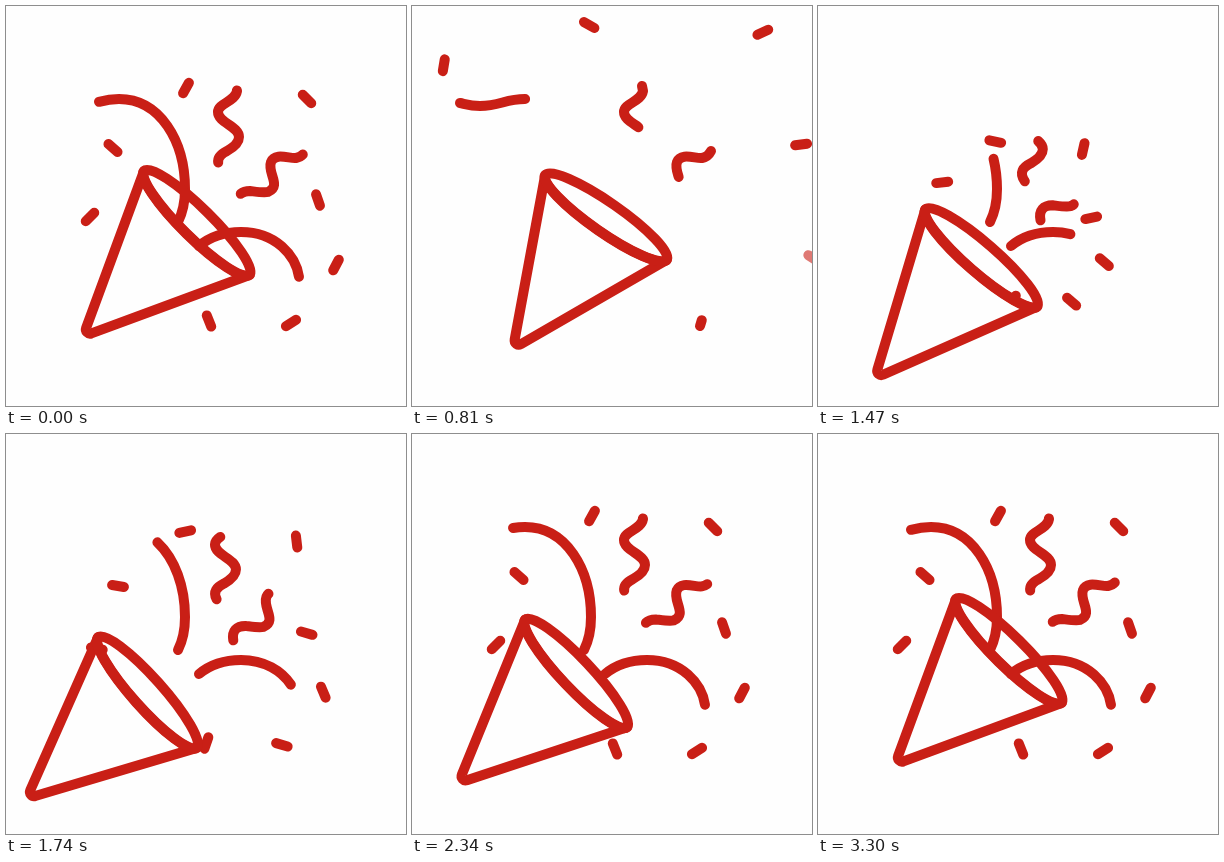
Write an HTML page that moves like this. It is 400x400 px and loops after 5330 ms.

```html
<!DOCTYPE html>
<html lang="en">
<head>
<meta charset="utf-8">
<title>Party popper</title>
<style>
html, body { margin: 0; width: 100%; height: 100%; overflow: hidden; background: #fefefe; }
svg { display: block; width: 100%; height: 100%; }
</style>
</head>
<body>
<svg id="stage" viewBox="0 0 400 400" fill="none" stroke="#c91f16" stroke-width="10"
  stroke-linecap="round" stroke-linejoin="round"></svg>
<script>
const LOOP = 5330, STEP = 30, REST = 3300, BURST = 1230;
const stage = document.getElementById('stage');

const clamp = v => Math.max(0, Math.min(1, v));
const mix = (a, b, u) => a + (b - a) * u;
const mixAll = (a, b, u) => a.map((v, i) => mix(v, b[i], u));
const span = (t, from, to) => clamp((t - from) / (to - from));
const easeOut = u => 1 - (1 - u) ** 3;
const smooth = u => u * u * (3 - 2 * u);

function set(el, attrs) {
  for (const key in attrs) el.setAttribute(key, attrs[key]);
}
function add(name, attrs = {}, parent = stage) {
  const el = document.createElementNS('http://www.w3.org/2000/svg', name);
  set(el, attrs);
  return parent.appendChild(el);
}
function place(el, x, y, angle) {
  set(el, { transform: `translate(${x} ${y}) rotate(${angle})` });
}
function show(el, on) {
  el.style.display = on ? '' : 'none';
}

// Confetti: resting place, angle, spin, and the place it flies off to.
const confetti = [
  [180, 82, -61, -95, 177, 15],
  [301, 93, 45, -75, 354, 22],
  [107, 142, 41, 62, 27, 54],
  [84, 211, -45, -110, -16, 311],
  [203, 315, 68, -80, 240, 393],
  [285, 317, -32, -95, 366, 363],
  [330, 259, -62, 100, 406, 252],
  [312, 194, 71, 108, 394, 135]
].map(([x, y, angle, spin, farX, farY]) => {
  const dash = () => add('path', { d: 'M-6 0H6' });
  return { x, y, angle, spin, farX, farY, leaving: dash(), coming: dash() };
});

function drawConfetti(c, t) {
  // Lower and further left pieces fade first.
  const p = easeOut(span(t, 0, 1330)), gone = 1180 + c.farX * 0.5 - c.farY * 1.8;
  show(c.leaving, t < gone);
  place(c.leaving, mix(c.x, c.farX, p), mix(c.y, c.farY, p), c.angle + c.spin * p);
  set(c.leaving, { opacity: clamp((gone - t) / 200) });

  // New pieces spread from a small cluster inside the cone.
  const u = Math.min(1, (t - BURST) / 1040), left = 1 - easeOut(u);
  show(c.coming, t >= BURST - 60);
  place(c.coming, mix(c.x, 170, 0.6 * left), mix(c.y, 250, 0.7 * left),
    c.angle - c.spin * (1 - u));
}

// Ribbons: a window slides along each path. "over" is the path left beyond
// the resting head, "tail" the start of the resting window.
const ribbons = [
  { d: 'M172 216C178 204 179 192 179 183C179 135 154 93 113 93C93 93 88 100 68 100C58 100 53 98 48 97',
    over: 46, tail: 0, out: 1150, back: 1730 },
  { d: 'M193 240C205 230 220 226 235 226C270 226 290 250 293 271C295 290 293 305 288 320',
    over: 50, tail: 0, out: 840, back: 1160 },
  { d: 'M215 163C209 154 213 149 221 145C228 141 233 137 233 131C233 120 212 117 212 106C212 97 229 96 231 85L230 80',
    over: 5, tail: 7, out: 1200, back: 1200, curly: true },
  { d: 'M232 200C230 190 235 185 244 185C252 186 258 187 262 186C276 180 261 167 265 156C269 146 284 153 290 152C295 151 297 149 299 145',
    over: 4.5, tail: 13, out: 1200, back: 1500, curly: true }
];
for (const r of ribbons) {
  r.el = add('path', { d: r.d });
  r.length = r.el.getTotalLength();
}

function drawRibbon(r, t) {
  const rest = r.length - r.over;
  let head, tail, left = 0;
  if (t < BURST) {
    head = mix(rest, r.length, span(t, 0, 420));
    tail = mix(r.tail, r.length, span(t, 0, r.out) ** (r.curly ? 2 : 1));
  } else {
    const p = easeOut(span(t, BURST, BURST + r.back));
    head = rest * p;
    tail = r.tail * span(p, 0.7, 1);
    if (r.curly) left = 1 - p;
  }
  show(r.el, head > tail);
  place(r.el, -16 * left, 24 * left, 0);
  set(r.el, {
    'stroke-dasharray': `${Math.max(0, head - tail)} 9999`,
    'stroke-dashoffset': -tail
  });
}

const cone = add('g');
const body = add('path', {
  d: 'M61-165.5L3.1-8.5A4.2 4.2 0 0 0 8.4-3.1L166.5-61.5A74.1 15 44.6 0 1 61-165.5'
}, cone);
add('ellipse', { rx: 74.1, ry: 15, transform: 'translate(113.75 -113.5) rotate(44.6)' }, cone);

// Cone poses: tip x, tip y, tilt.
const idle = [77, 330.5, 0], wound = [113.5, 349, -14.8], blown = [20, 365, 3.7];
const RECOILED = 1650;

function drawCone(t) {
  const kick = span(t, BURST, RECOILED);
  const [x, y, tilt] =
    t < BURST ? mixAll(idle, wound, t / BURST) :
    t < RECOILED ? mixAll(wound, blown, smooth(kick)) :
    mixAll(blown, idle, smooth(span(t, RECOILED, 3100)));
  place(cone, x, y + 14 * Math.sin(Math.PI * kick), tilt);
  // The front wall hides whatever is still inside during the burst.
  set(body, { fill: t > 1130 && t < 1500 ? '#fefefe' : 'none' });
}

function frame() {
  const now = performance.now() % LOOP;
  const t = Math.min(REST, Math.floor(now / STEP) * STEP);
  confetti.forEach(c => drawConfetti(c, t));
  ribbons.forEach(r => drawRibbon(r, t));
  drawCone(t);
  requestAnimationFrame(frame);
}
frame();
</script>
</body>
</html>
```
